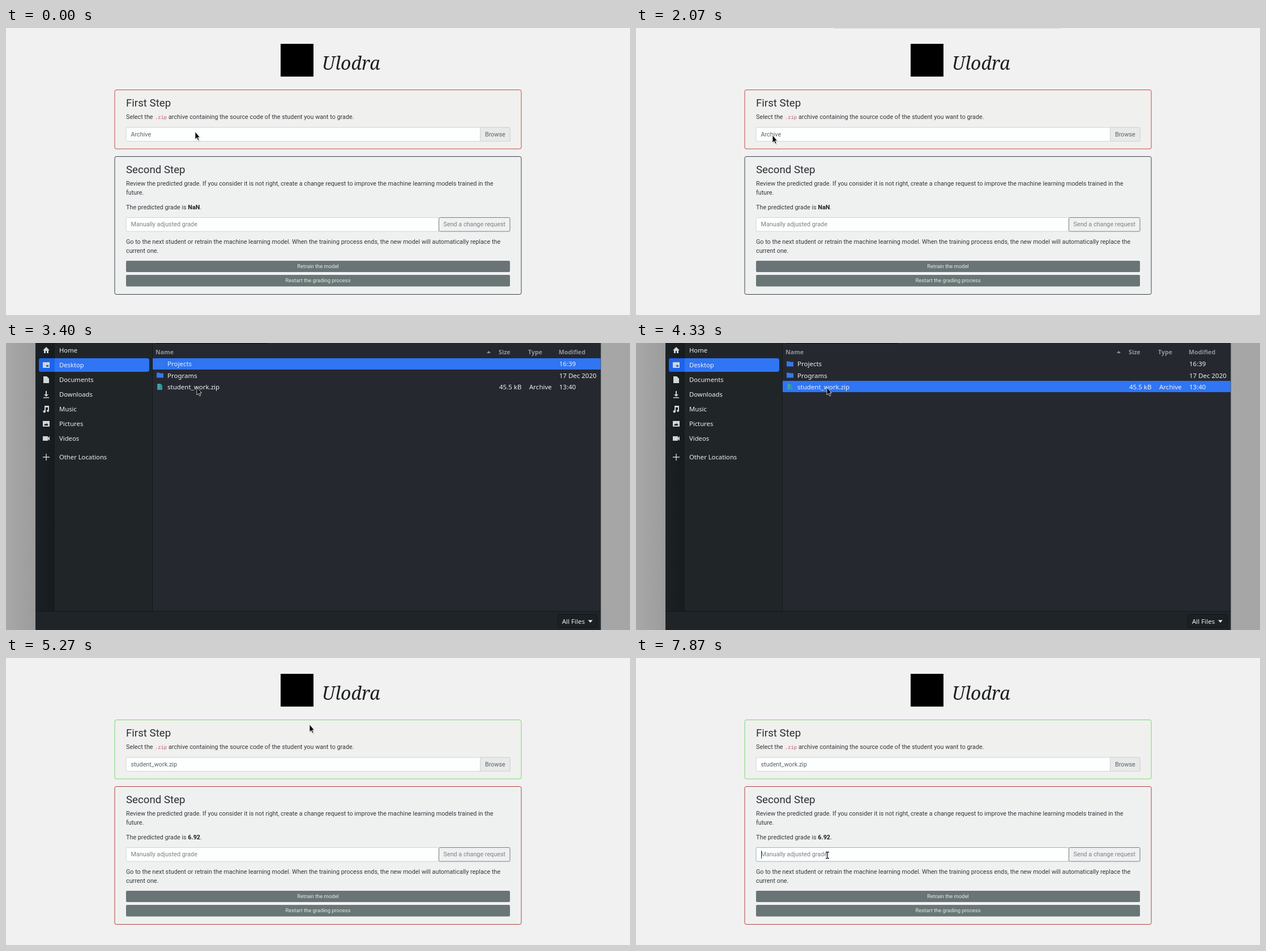
These frames come from a looping animation (1102x508 px, 8 s). An HTML page:

```html
<!DOCTYPE html>
<html lang="en">
<head>
<meta charset="utf-8">
<title>Grading assistant</title>
<style>
html, body { margin: 0; width: 100%; height: 100%; overflow: hidden; background: #f1f1f1; }
svg { display: block; width: 1102px; height: 508px; }
text { white-space: pre; }
.page { font: 10.8px Roboto, sans-serif; fill: #33383c; }
.page .title { font-size: 18.7px; fill: #2b2f33; }
.page .muted { fill: #7a8186; }
.page .field { fill: #5b6267; }
.page .code { font: 8.8px "Liberation Mono", monospace; fill: #bd5a70; }
.page .button { font-size: 9.4px; fill: #e4e8e8; text-anchor: middle; }
.page .brand { font: italic 32px "Noto Serif", serif; fill: #1d2022; }
.page .bold { font-weight: 700; fill: #202428; }
.dialog { font: 11.25px "Noto Sans", sans-serif; fill: #f0f1f2; }
.dialog .list { font-size: 11.5px; }
.dialog .head { font-size: 10.7px; font-weight: 700; fill: #90959b; }
</style>
</head>
<body>
<svg id="stage" viewBox="0 0 1102 508" xmlns="http://www.w3.org/2000/svg"></svg>
<script>
const LOOP = 8000;
const TICK = 1000 / 15;

const text = (x, y, value, cls = "", id = "") =>
  `<text x="${x}" y="${y}" class="${cls}" id="${id}">${value}</text>`;
const rect = (x, y, w, h, fill, extra = "") =>
  `<rect x="${x}" y="${y}" width="${w}" height="${h}" fill="${fill}" ${extra}/>`;
const path = (d, extra = "") => `<path d="${d}" ${extra}/>`;

function pageMarkup() {
  const edge = 'stroke="#cfd4d6"';
  return `<g class="page">
    ${rect(0, 0, 1102, 508, "#f1f1f1")}
    <g id="topEdge">${rect(350, 0, 400, 1, "#d6d6d6")}</g>
    ${rect(485, 28, 58, 58, "#000")}
    ${text(558, 74, "Ulodra", "brand")}

    ${rect(192, 109.5, 718, 104.5, "#f0f0ef", 'rx="3" id="firstCard"')}
    ${text(212, 139, "First Step", "title")}
    ${text(212, 161, "Select the")}
    ${text(263, 161, ".zip", "code")}
    ${text(287, 161, "archive containing the source code of the student you want to grade.")}
    ${rect(212, 176, 678, 24.5, "#fdfefe", edge + ' rx="2"')}
    ${rect(837.5, 176, 52.5, 24.5, "#e8e9e9", edge + ' rx="1"')}
    ${text(220.5, 192, "", "field", "fileName")}
    ${text(846, 192, "Browse", "field")}

    ${rect(192, 227.5, 718, 244, "#eff1f1", 'rx="3" id="secondCard"')}
    ${text(212, 257, "Second Step", "title")}
    ${text(212, 279, "Review the predicted grade. If you consider it is not right, create a change request to improve the machine learning models trained in the")}
    ${text(212, 294.5, "future.")}
    <text x="212" y="320.5">The predicted grade is <tspan class="bold" id="grade"></tspan>.</text>
    ${rect(212, 335.5, 552.5, 24.5, "#fdfefe", 'rx="2" id="gradeField"')}
    ${rect(764.5, 335.5, 125.5, 24.5, "none", 'rx="2" stroke="#747c81"')}
    ${text(220.5, 351, "Manually adjusted grade", "muted")}
    ${text(772.5, 351, "Send a change request", "muted")}
    ${rect(221, 341, 1, 14, "#24282c", 'id="caret"')}
    ${text(212, 382, "Go to the next student or retrain the machine learning model. When the training process ends, the new model will automatically replace the")}
    ${text(212, 397.5, "current one.")}
    ${rect(212, 412, 678, 20, "#6a7477", 'rx="2"')}
    ${rect(212, 437, 678, 20.5, "#697675", 'rx="2"')}
    ${text(551, 425, "Retrain the model", "button")}
    ${text(551, 450, "Restart the grading process", "button")}

    <g id="tooltip" class="dialog">
      ${rect(242, 209, 106, 36, "#1b1f23", 'rx="5"')}
      ${text(251.5, 231, "No file selected.")}
    </g>
  </g>`;
}

// Sidebar entries: label, row centre, icon drawn around (0, 0).
const places = [
  ["Home", 13, path("M0-6L6 0H4V5H1V1H-1V5H-4V0H-6Z")],
  ["Desktop", 39, path("M-6-5H6V5H-6ZM0 0V3H4V0Z", 'fill-rule="evenodd"')],
  ["Documents", 65, path("M-5-6H1L5-2V6H-5Z")],
  ["Downloads", 91, path("M-1-6H1V0H4L0 4L-4 0H-1ZM-5 5H5V6.5H-5Z")],
  ["Music", 117, path("M-3-6H5V3A2 2 0 1 1 3 1V-3H-1V4A2.2 2.2 0 1 1-3 2Z")],
  ["Pictures", 143, path("M-6-5H6V5H-6ZM-4 3H4L1-1L-1 1L-2 0Z", 'fill-rule="evenodd"')],
  ["Videos", 169, path("M-6-4H3V-1L6-4V4L3 1V4H-6Z")],
  ["Other Locations", 202, path("M-6-.7H-.7V-6H.7V-.7H6V.7H.7V6H-.7V.7H-6Z")]
];

const folder = y => path(`M266 ${y - 4.5}h5l1 1h6v8h-12Z`, 'fill="#3478ec"');

function dialogMarkup() {
  const sidebar = places.map(([label, y, icon]) =>
    `<g transform="translate(71 ${y})" fill="#d2d5d7">${icon}</g>` + text(94, y + 4, label)).join("");
  return `<g id="dialog" class="dialog">
    <defs>
      <linearGradient id="shade"><stop stop-color="#a8a8a8"/><stop offset="1" stop-color="#9c9c9c"/></linearGradient>
      <linearGradient id="strip"><stop stop-color="#1b2124"/><stop offset="1" stop-color="#161b1e"/></linearGradient>
    </defs>
    ${rect(0, 0, 1102, 508, "#a6a6a6")}
    ${rect(0, 0, 52, 508, "url(#shade)")}
    ${rect(52, 0, 998.5, 508, "#1f2428")}
    ${rect(52, 0, 34, 475, "url(#strip)")}
    ${rect(86, 0, 172, 475, "#202528")}
    ${rect(259, 0, 791, 475, "#25282f")}
    ${rect(258, 0, 1, 475, "#14181b")}
    ${rect(52, 474.5, 998, 1, "#14181b")}
    ${rect(265, 0, 197, 1, "#0b0d0f")}
    ${rect(52, 506, 998, 2, "#281d28")}
    ${rect(54, 189, 204, 25, "#2a2f32", 'id="placeHover"')}
    ${rect(58, 27, 195, 24, "#2f75f4", 'rx="4"')}
    ${path("M86 27H62a4 4 0 0 0-4 4V47a4 4 0 0 0 4 4H86Z", 'fill="#1d64ea"')}
    ${sidebar}
    ${rect(259, 27, 791, 20, "#2f75f4", 'id="selection"')}
    <g class="head">
      ${text(264, 20, "Name")}${text(870, 20, "Size")}${text(922, 20, "Type")}${text(976, 20, "Modified")}
      ${path("M849 18L852.5 14L856 18Z")}
    </g>
    <g class="list">
      ${folder(37)}${folder(57)}
      ${path("M267 72H273L276 75V83H267Z", 'fill="#2e97a0"')}
      ${path("M270 73V82", 'stroke="#c5e5e4" stroke-dasharray="1 1.5"')}
      ${text(285, 41, "Projects")}${text(977, 41, "16:39")}
      ${text(285, 61.5, "Programs")}${text(977, 61.5, "17 Dec 2020")}
      ${text(285, 81.5, "student_work.zip")}${text(871, 81.5, "45.5 kB")}
      ${text(924, 81.5, "Archive")}${text(977, 81.5, "13:40")}
      ${rect(974.5, 480.5, 70, 23, "#1b2023", 'rx="3" stroke="#111518"')}
      ${text(982, 496.5, "All Files")}
      ${path("M1028 490.5H1036L1032 495Z")}
    </g>
  </g>`;
}

const pointerMarkup = `
  <g id="arrow">
    ${path("M1 1V15L4 12L6 17L8.5 16L6.5 11H10Z", 'fill="#000" opacity=".15"')}
    ${path("M0-.5V13L3 10.3L5 15L7 14L5 9.6H8.5Z", 'fill="#0a0a0a" stroke="#f5f5f5" stroke-width=".8"')}
  </g>
  <g id="beam" fill="none">
    ${path("M-3-5.5H-1L0-4.5L1-5.5H3M0-4.5V4.5M-3 5.5H-1L0 4.5L1 5.5H3", 'stroke="#1c1c1c" stroke-width="1.3"')}
  </g>`;

document.getElementById("stage").innerHTML = pageMarkup() + dialogMarkup() + pointerMarkup;
const el = id => document.getElementById(id);

// Pointer moves: first tick, last tick, x, y reached.
const start = [334, 184];
const moves = [
  [0, 2, 169, 188], [3, 5, 157, 186], [6, 8, 166, 189], [12, 14, 235, 189], [15, 16, 241, 190],
  [42, 47, 330, 55], [48, 51, 337, 79], [75, 83, 735, 157], [84, 86, 756, 169], [87, 88, 757, 169],
  [90, 91, 741, 168], [94, 95, 662, 195], [96, 98, 471, 262], [99, 106, 336, 326], [110, 112, 338, 349]
];

const progress = (tick, from, to) => Math.min(1, Math.max(0, (tick - from) / (to - from)));
const show = (id, on) => { el(id).style.display = on ? "" : "none"; };

function pointerAt(tick) {
  let [x, y] = start;
  for (const [from, to, nx, ny] of moves) {
    const p = progress(tick, from, to);
    x += (nx - x) * p;
    y += (ny - y) * p;
  }
  return [x, y];
}

function mix(a, b, p) {
  const parts = a.map((v, i) => Math.round(v + (b[i] - v) * p));
  return `rgb(${parts})`;
}

const RED = [190, 76, 66], GREEN = [120, 214, 112], DARK = [58, 64, 72], DARK_RED = [176, 66, 63];
const EDGE = [207, 212, 214], FOCUS = [146, 183, 200];

function render(ms) {
  const tick = Math.floor(ms / TICK + 0.06);
  const graded = progress(tick, 76, 79);
  const [x, y] = pointerAt(tick);
  const onField = tick >= 111;

  el("firstCard").setAttribute("stroke", mix(RED, GREEN, graded));
  el("secondCard").setAttribute("stroke", mix(DARK, DARK_RED, graded));
  el("gradeField").setAttribute("stroke", mix(EDGE, FOCUS, progress(tick, 114, 117)));
  el("fileName").textContent = tick < 67 ? "Archive" : "student_work.zip";
  el("grade").textContent = tick < 77 ? "NaN" : "6.92";
  show("caret", tick >= 115);
  show("topEdge", (tick >= 31 && tick < 38) || tick === 66);

  show("tooltip", tick >= 16 && tick < 31);
  el("tooltip").setAttribute("opacity", progress(tick, 15, 18));

  show("dialog", tick >= 38 && tick < 66);
  show("placeHover", tick < 43);
  el("selection").setAttribute("y", tick < 52 ? 27 : 67);

  show("arrow", !onField);
  show("beam", onField);
  el(onField ? "beam" : "arrow").setAttribute("transform", `translate(${x} ${y})`);
}

const began = performance.now();
function frame() {
  render((performance.now() - began) % LOOP);
  requestAnimationFrame(frame);
}
render(0);
requestAnimationFrame(frame);
</script>
</body>
</html>
```
